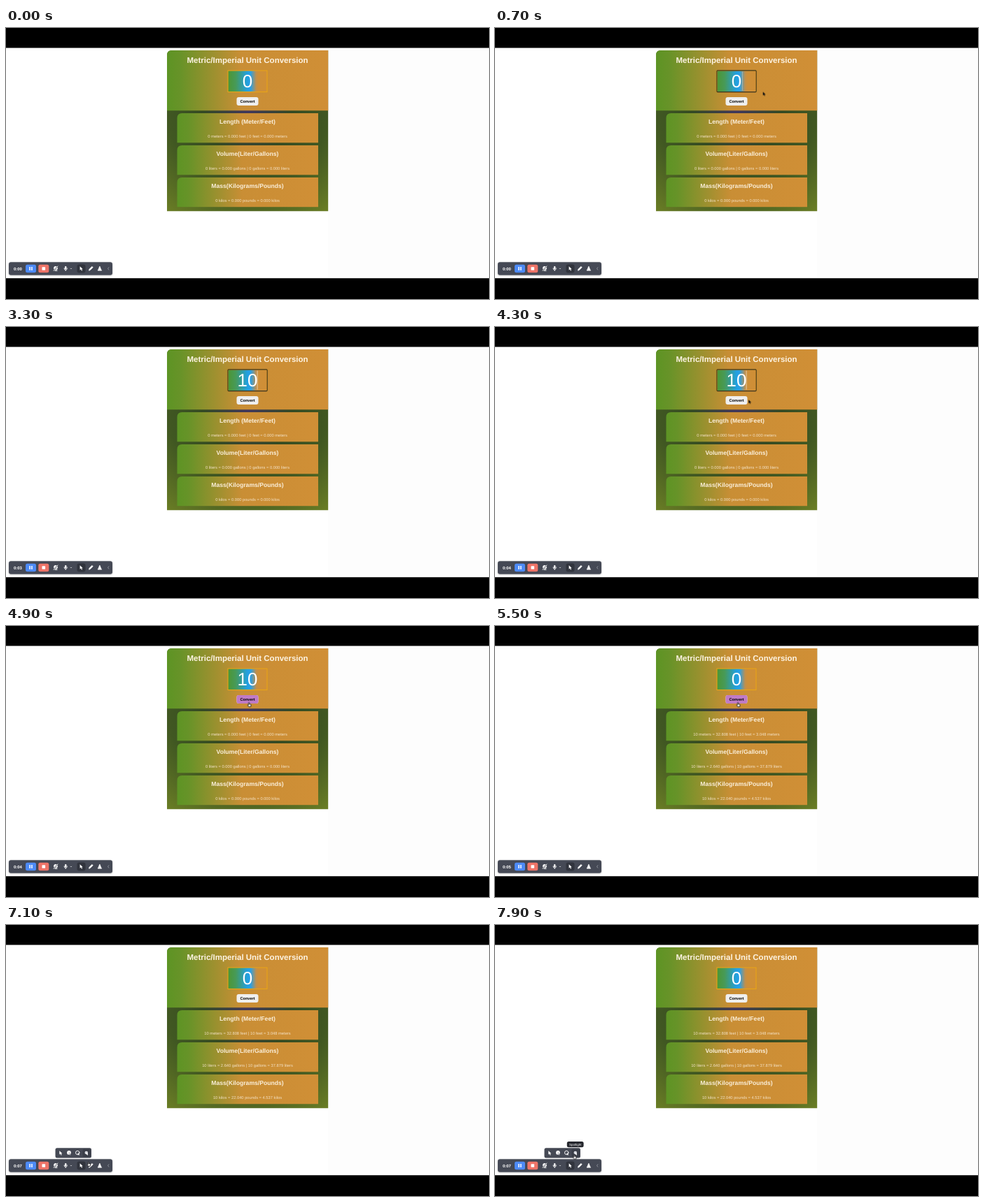
Recreate the animation shown at these times as an HTML page. Size 690 px wide and 388 px high, loop 8000 ms.

```html
<!DOCTYPE html>
<html lang="en">
<head>
<meta charset="utf-8">
<title>Unit conversion</title>
<style>
html, body { margin: 0; width: 100%; height: 100%; overflow: hidden; background: #fff; }
svg { display: block; width: 690px; height: 388px; font-family: "Liberation Sans", Arial, sans-serif; text-rendering: geometricPrecision; }
.mid { text-anchor: middle; }
.title { font-size: 11.5px; font-weight: 700; fill: #fdf3e2; }
.head { font-size: 8.62px; font-weight: 700; fill: #fbefda; }
.body { font-size: 5.75px; fill: #f4e2c6; }
.value { font-size: 25.9px; fill: #fff; }
.btn { font-size: 5.6px; font-weight: 700; }
.clock { font-size: 6px; font-weight: 700; fill: #fff; }
.tip text { font-size: 4.5px; fill: #fff; }
.icon { fill: none; stroke: #fff; stroke-width: .9; stroke-linecap: round; stroke-linejoin: round; }

/* 8 s timeline: 1% = 80 ms */
.zero, .one, .ten, .before, .after, .focus, .caret, .hover, .menu, .tip, .arrow, .hand {
  animation: 8s step-end infinite;
}
.zero { animation-name: zero; }
.one { animation-name: one; }
.ten { animation-name: ten; }
.before { animation-name: before; }
.after { animation-name: after; }
.focus { animation-name: focus; }
.caret { animation-name: caret; }
.hover { animation-name: hover; }
.menu { animation-name: menu; }
.tip { animation-name: tip; }
.arrow { animation-name: arrow; }
.hand { animation-name: hand; }
.digits { animation: digits 8s steps(8) infinite; }
.cursor { animation: move 8s infinite; }

@keyframes zero { 0% { opacity: 1 } 12.5% { opacity: 0 } 63.75%, 100% { opacity: 1 } }
@keyframes one { 0% { opacity: 0 } 38.75% { opacity: 1 } 40%, 100% { opacity: 0 } }
@keyframes ten { 0% { opacity: 0 } 40% { opacity: 1 } 63.75%, 100% { opacity: 0 } }
@keyframes before { 0% { opacity: 1 } 63.75%, 100% { opacity: 0 } }
@keyframes after { 0% { opacity: 0 } 63.75%, 100% { opacity: 1 } }
@keyframes focus { 0% { opacity: 0 } 1.25% { opacity: 1 } 61%, 100% { opacity: 0 } }
@keyframes caret {
  0% { opacity: 0; transform: translateX(353px) }
  1.25% { opacity: .3; transform: translateX(353px) }
  12.5% { opacity: 1; transform: translateX(345px) }
  38.75% { opacity: .6; transform: translateX(352px) }
  40% { opacity: .6; transform: translateX(358.6px) }
  61%, 100% { opacity: 0; transform: translateX(358.6px) }
}
@keyframes hover { 0% { opacity: 0 } 55% { opacity: 1 } 76.25%, 100% { opacity: 0 } }
@keyframes menu { 0% { opacity: 0 } 88.75%, 100% { opacity: 1 } }
@keyframes tip { 0% { opacity: 0 } 97.5%, 100% { opacity: 1 } }
@keyframes arrow {
  0% { opacity: 0 } 1.25% { opacity: 1 } 34.8% { opacity: 0 } 50% { opacity: 1 }
  55% { opacity: 0 } 76.25% { opacity: 1 } 87.5%, 100% { opacity: 0 }
}
@keyframes hand { 0% { opacity: 0 } 55% { opacity: 1 } 76.25% { opacity: 0 } 87.5%, 100% { opacity: 1 } }
@keyframes digits { to { transform: translateY(-80px) } }
@keyframes move {
  0%, 1.25% { transform: translate(360px, 80px); animation-timing-function: steps(2) }
  3.75% { transform: translate(382.7px, 91.5px); animation-timing-function: step-end }
  50% { transform: translate(387px, 99px); animation-timing-function: steps(4) }
  55% { transform: translate(354px, 106px); animation-timing-function: steps(3) }
  58.75%, 75% { transform: translate(346.5px, 109.2px); animation-timing-function: steps(4) }
  79.8% { transform: translate(141.5px, 320.5px); animation-timing-function: steps(4) }
  85%, 86.25% { transform: translate(136.5px, 325px); animation-timing-function: steps(3) }
  90%, 92.5% { transform: translate(107.5px, 346px); animation-timing-function: steps(3) }
  96.25%, 100% { transform: translate(112.6px, 328.6px) }
}
</style>
</head>
<body>
<svg viewBox="0 0 690 388">
  <defs>
    <linearGradient id="warm">
      <stop stop-color="#5d9424"/><stop offset=".08" stop-color="#679328"/>
      <stop offset=".46" stop-color="#c98e35"/><stop offset="1" stop-color="#d08f36"/>
    </linearGradient>
    <linearGradient id="field">
      <stop stop-color="#4c9634"/><stop offset=".2" stop-color="#479a58"/>
      <stop offset=".5" stop-color="#22a0e2"/><stop offset=".58" stop-color="#2aa0e4"/>
      <stop offset=".72" stop-color="#c08f4c"/><stop offset=".78" stop-color="#ce8f38"/>
      <stop offset="1" stop-color="#d08f36"/>
    </linearGradient>
    <radialGradient id="dark" gradientUnits="userSpaceOnUse" cx="345" cy="118" r="185">
      <stop stop-color="#41365c"/><stop offset=".16" stop-color="#3a4040"/>
      <stop offset=".35" stop-color="#344a22"/><stop offset=".62" stop-color="#415822"/>
      <stop offset="1" stop-color="#6b7e25"/>
    </radialGradient>
    <clipPath id="slot"><rect x="10" y="340" width="16" height="8.5"/></clipPath>
    <filter id="soft" x="-10%" y="-40%" width="120%" height="190%"><feDropShadow dx="0" dy=".6" stdDeviation=".9" flood-opacity=".3"/></filter>
    <path id="card" d="M244.5 164.3V129q0-7 7-7H446V164.3z" fill="url(#warm)"/>
    <path id="ptr" d="M0 0V5.6L1.4 4.4 2.4 6.5 3.4 6 2.5 4.1 4.2 4z"/>
  </defs>

  <rect width="690" height="388" fill="#fff"/>
  <rect x="460" y="28" width="230" height="331" fill="#fdfdfd"/>
  <path d="M0 0H690V28.6H0zM0 358.3H690V388H0z"/>

  <!-- converter -->
  <path d="M230 262.2V39q0-7 7-7H460.2V262.2z" fill="url(#dark)"/>
  <path d="M230 118.3V39q0-7 7-7H460.2V118.3z" fill="url(#warm)"/>
  <text class="title mid" x="345" y="50">Metric/Imperial Unit Conversion</text>

  <rect x="317" y="61" width="56" height="30.5" fill="url(#field)" stroke="#e9a416" stroke-width="1.1"/>
  <rect class="focus" x="316.9" y="60.9" width="56.3" height="30.7" rx="1" fill="none" stroke="#3a3220" stroke-width="1.1"/>
  <g class="value mid">
    <text class="zero" x="345" y="85">0</text>
    <text class="one" x="345" y="85">1</text>
    <text class="ten" x="345" y="85">10</text>
  </g>
  <rect class="caret" y="62.5" width=".9" height="27" fill="#fff"/>

  <rect x="329.5" y="99" width="31" height="12" rx="3" fill="#efefef"/>
  <rect class="hover" x="329.5" y="99" width="31" height="12" rx="3" fill="#c07bc6"/>
  <text class="btn mid" x="345" y="107.1">Convert</text>

  <use href="#card"/><use href="#card" y="46"/><use href="#card" y="92"/>
  <g class="head mid">
    <text x="345" y="137">Length (Meter/Feet)</text>
    <text x="345" y="183">Volume(Liter/Gallons)</text>
    <text x="345" y="229">Mass(Kilograms/Pounds)</text>
  </g>
  <g class="body mid before">
    <text x="345" y="157">0 meters = 0.000 feet | 0 feet = 0.000 meters</text>
    <text x="345" y="203">0 liters = 0.000 gallons | 0 gallons = 0.000 liters</text>
    <text x="345" y="249">0 kilos = 0.000 pounds = 0.000 kilos</text>
  </g>
  <g class="body mid after">
    <text x="345" y="157">10 meters = 32.808 feet | 10 feet = 3.048 meters</text>
    <text x="345" y="203">10 liters = 2.640 gallons | 10 gallons = 37.879 liters</text>
    <text x="345" y="249">10 kilos = 22.040 pounds = 4.537 kilos</text>
  </g>

  <!-- recorder bar -->
  <rect x="4" y="335.3" width="148" height="18.4" rx="3" fill="#454954" filter="url(#soft)"/>
  <g class="clock" clip-path="url(#slot)">
    <text x="10.9" y="346.5">0:0</text>
    <g class="digits">
      <text x="19.6" y="346.5">0</text><text x="19.6" y="356.5">1</text>
      <text x="19.6" y="366.5">2</text><text x="19.6" y="376.5">3</text>
      <text x="19.6" y="386.5">4</text><text x="19.6" y="396.5">5</text>
      <text x="19.6" y="406.5">6</text><text x="19.6" y="416.5">7</text>
    </g>
  </g>
  <rect x="28" y="338.8" width="15" height="11.4" rx="2.5" fill="#4d8af5"/>
  <path d="M33.3 342h1.5v5h-1.5zM36.2 342h1.5v5h-1.5z" fill="#fff"/>
  <rect x="46.3" y="338.8" width="15" height="11.4" rx="2.5" fill="#ee7468"/>
  <rect x="51.5" y="342.2" width="4.6" height="4.6" rx=".6" fill="#fff"/>
  <circle cx="71" cy="343.8" r="2.9" fill="#fff"/>
  <path d="M68.2 347.4l5.8-6.4" stroke="#454954" stroke-width="1.6"/>
  <g class="icon">
    <path d="M68 347.6l6-6.6M70 347.6h3"/>
    <path d="M83 344q0 2.4 2.2 2.4T87.4 344M85.2 346.4v1.2"/>
    <path d="M92.2 344.3l.8.6.8-.6" stroke-width=".6"/>
    <path d="M118.7 346.9l.5-1.7 3.7-3.7 1.2 1.2-3.7 3.7z" fill="#fff"/>
    <path d="M134 341.6l2.1 5.2h-4.2z" fill="#fff"/><path d="M131.3 347h5.4"/>
    <path d="M146.8 342.8l-1.2 1.7 1.2 1.7" stroke="#aeb1b8" stroke-width=".7"/>
  </g>
  <rect x="84" y="341" width="2.4" height="4.4" rx="1.2" fill="#fff"/>
  <rect x="101.5" y="338.5" width="12" height="12" rx="3" fill="#31343d"/>
  <use href="#ptr" x="105.6" y="341.2" fill="#fff"/>

  <g class="menu">
    <rect x="70.5" y="319.2" width="51.5" height="14.2" rx="2.5" fill="#454954"/>
    <use href="#ptr" x="76.3" y="323.2" fill="#fff"/>
    <circle cx="90" cy="326" r="2.9" fill="#fff"/>
    <use href="#ptr" transform="translate(90 325.6) scale(.65)" fill="#fff" stroke="#454954" stroke-width=".6"/>
    <circle class="icon" cx="102.2" cy="326" r="2.7"/>
    <use href="#ptr" transform="translate(102.6 326) scale(.6)" fill="#fff"/>
    <rect x="109.5" y="320.5" width="11" height="11.5" rx="2.5" fill="#3a3e48"/>
    <circle cx="114.8" cy="326" r="2.3" fill="#d9dbe0"/>
    <use href="#ptr" transform="translate(115 325.8) scale(.6)" fill="#fff"/>
  </g>
  <g class="tip">
    <rect x="102.8" y="310" width="23.8" height="8.2" rx="2.5" fill="#25272d"/>
    <text class="mid" x="114.7" y="315.6">Spotlight</text>
  </g>

  <g class="cursor">
    <use class="arrow" href="#ptr" transform="scale(.9)" fill="#111"/>
    <path class="hand" d="M0 .6Q.7-.3 1.2.6V2.6L3 3Q3.7 3.2 3.6 4L3.1 6.3H.3L-1.4 4Q-1.3 3.2 0 3.9z" fill="#fff" stroke="#16161a" stroke-width=".9"/>
  </g>
</svg>
</body>
</html>
```
